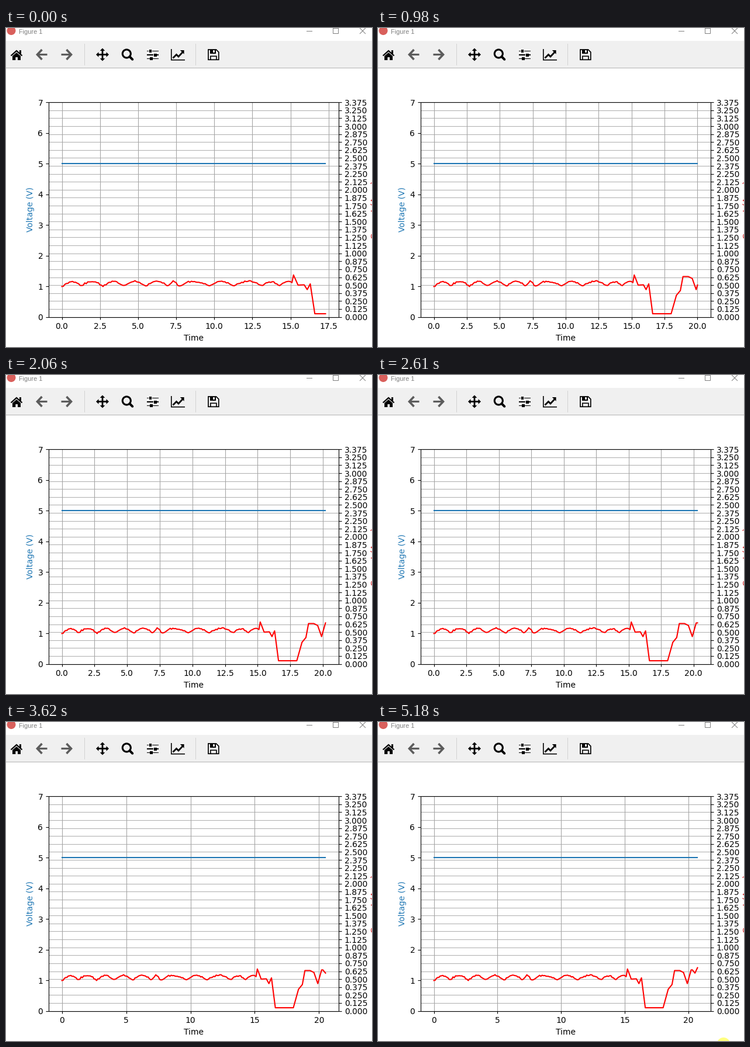
Animation of 626x546 px, one loop 5260 ms. Source, as a matplotlib script:

```python
import numpy as np
import matplotlib.pyplot as plt
from matplotlib.animation import FuncAnimation
from matplotlib.collections import LineCollection
from matplotlib.patches import Circle, Polygon, Rectangle

W, H, DPI = 626, 546, 100
LOOP, STEP = 5260, 20
PX = 72 / DPI  # points per pixel
LEFT, RIGHT, TOP, BOTTOM = 73, 569, 127.24, 494.53
MID_X, MID_Y = (LEFT + RIGHT) / 2, (TOP + BOTTOM) / 2
TICK, LABEL_GAP, LABEL_PAD = 3.5 / PX, 7 / PX, 4 / PX
VOLT_MAX, AMP_MAX, AMP_STEP = 7, 3.375, 0.125
BLUE, RED = "#1f77b4", "#ff0000"
ARROW_GREY, CONTROL_GREY, BAR_GREY = "#5c5c5c", "#808080", "#f0f0f0"

ARRIVALS = [120, 200, 430, 980, 1520, 2060, 2610, 3070, 3620, 4170, 4780]
FIRST_COUNT, SKIPPED, JUMP = 173, 23, 200
POINTER_TIME = 5180

# Moments (s) at which the steady ripple bottoms out.
DIPS = [0.1, 1.25, 2.7, 4.05, 5.5, 7.0, 7.65, 9.7, 11.25, 13.15, 14.25, 15.4]
# Switch-off and restart: (s, A).
EVENTS = [
    (15.1, 0.54), (15.2, 0.66), (15.5, 0.50), (15.9, 0.505), (16.1, 0.43),
    (16.3, 0.52), (16.6, 0.05), (18.0, 0.05), (18.4, 0.34), (18.7, 0.415),
    (18.9, 0.635), (19.3, 0.635), (19.6, 0.605), (19.9, 0.43), (20.2, 0.645),
    (20.3, 0.645), (20.5, 0.595), (20.7, 0.68),
]


def build_current(times):
    phase = np.interp(times, DIPS, range(len(DIPS)))
    noise = np.random.default_rng(4).normal(0, 0.006, len(times))
    ripple = 0.483 + 0.075 * np.abs(np.sin(np.pi * phase)) + noise
    event_times, event_amps = zip(*EVENTS)
    return np.where(times < event_times[0] - 0.01, ripple,
                    np.interp(times, event_times, event_amps))


TIMES = np.arange(208) / 10
CURRENT = build_current(TIMES)

plt.rcParams["font.family"] = "DejaVu Sans"
fig = plt.figure(figsize=(W / DPI, H / DPI), dpi=DPI, facecolor="white")
ax = fig.add_axes([0, 0, 1, 1])
ax.set(xlim=(0, W), ylim=(H, 0))
ax.autoscale(False)
ax.axis("off")


def stroke(points, width=1.0, color="black", **kw):
    x, y = zip(*points)
    style = dict(solid_capstyle="butt", solid_joinstyle="miter", zorder=4,
                 snap=False)
    return ax.plot(x, y, color=color, lw=width * PX, **{**style, **kw})[0]


def shape(points, color="black"):
    ax.add_patch(Polygon(points, color=color, lw=0, zorder=4))


def box(x0, y0, x1, y1, color="black", z=4):
    ax.add_patch(Rectangle((x0, y0), x1 - x0, y1 - y0, fc=color, lw=0, zorder=z))


def label(x, y, text, size=10, **kw):
    return ax.text(x, y, text, fontsize=size, **kw)


def segments(lines, color, z):
    group = LineCollection(lines, colors=color, linewidths=0.8, zorder=z)
    ax.add_collection(group, autolim=False)
    return group


def y_of(value, top_value):
    return BOTTOM - (BOTTOM - TOP) * np.asarray(value) / top_value


def draw_title_bar():
    ax.add_patch(Circle((9, 4.5), 7.5, color="#d9605c", lw=0))
    label(22, 10, "Figure 1", 7.9, color=CONTROL_GREY, family="Liberation Sans")
    stroke([(514, 5.5), (524, 5.5)], 1, CONTROL_GREY)
    ax.add_patch(Rectangle((559.5, 0.5), 9, 9, fill=False, ec=CONTROL_GREY,
                           lw=PX, snap=False))
    stroke([(605, 0), (615, 10)], 1, CONTROL_GREY)
    stroke([(605, 10), (615, 0)], 1, CONTROL_GREY)


def draw_arrow(tip, direction):
    bend, back, end = (tip + direction * d for d in (2, 10, 19))
    stroke([(bend, 45.5), (end, 45.5)], 3.2, ARROW_GREY)
    stroke([(back, 37), (bend, 45.5), (back, 54)], 3.6, ARROW_GREY)


def draw_home():
    stroke([(8.5, 47.5), (18, 39), (27.5, 47.5)], 2.2)
    box(23, 38, 25.6, 44)
    shape([(11, 48), (18, 42), (25, 48), (25, 55), (20, 55), (20, 50),
           (16.3, 50), (16.3, 55), (11, 55)])


def draw_move():
    cx, cy = 165, 45.5
    stroke([(cx - 8, cy), (cx + 8, cy)], 2.8)
    stroke([(cx, cy - 8), (cx, cy + 8)], 2.8)
    for s in (-1, 1):
        tip, base = 11 * s, 6.5 * s
        shape([(cx + tip, cy), (cx + base, cy - 4.3), (cx + base, cy + 4.3)])
        shape([(cx, cy + tip), (cx - 4.3, cy + base), (cx + 4.3, cy + base)])


def draw_search():
    ax.add_patch(Circle((206.3, 44), 7, fill=False, ec="black", lw=3.1 * PX,
                        zorder=4))
    stroke([(211.5, 49), (216.3, 53.8)], 4, solid_capstyle="round")


def draw_sliders():
    for y, knob in ((39.5, 247), (46, 255.2), (52.5, 248.5)):
        box(241, y - 0.9, 261, y + 0.9)
        box(knob - 2.9, y - 2.5, knob + 2.9, y + 2.5, BAR_GREY)
        box(knob - 2.3, y - 2.5, knob + 2.3, y + 2.5)


def draw_chart():
    stroke([(282.8, 36), (282.8, 54.7), (306, 54.7)], 1.6)
    stroke([(285.5, 51.5), (291.5, 45.5), (295, 49), (302.5, 41)], 2.8)
    shape([(304.6, 38), (304.6, 44.8), (297.8, 38)])


def draw_floppy():
    stroke([(346, 37), (359.5, 37), (363.8, 41.3), (363.8, 54.3), (346, 54.3),
            (346, 36.2)], 1.7)
    stroke([(349.8, 54), (349.8, 48.3), (360, 48.3), (360, 54)], 1.6)
    box(349, 37, 358.6, 43.5)
    box(354.3, 38, 357, 42, BAR_GREY)


def draw_toolbar():
    box(0, 22, W, 68, BAR_GREY, 1)
    stroke([(0, 68.5), (W, 68.5)], 1, "#b4b4b4")
    for x in (134.5, 324.5):
        stroke([(x, 27), (x, 64)], 1, "#d2d2d2")
    draw_home()
    draw_arrow(51.5, 1)
    draw_arrow(113.5, -1)
    draw_move()
    draw_search()
    draw_sliders()
    draw_chart()
    draw_floppy()


def draw_fixed_axes():
    amps = np.arange(0, AMP_MAX + 0.01, AMP_STEP)
    volts = np.arange(VOLT_MAX + 1)
    rows, volt_rows = y_of(amps, AMP_MAX), y_of(volts, VOLT_MAX)
    segments([[(LEFT, y), (RIGHT, y)] for y in rows], "#b4b4b4", 2)
    segments([[(RIGHT, y), (RIGHT + TICK, y)] for y in rows]
             + [[(LEFT - TICK, y), (LEFT, y)] for y in volt_rows], "black", 6)
    for a, y in zip(amps, rows):
        label(RIGHT + LABEL_GAP, y, f"{a:.3f}", va="center_baseline")
    for v, y in zip(volts, volt_rows):
        label(LEFT - LABEL_GAP, y, str(v), ha="right", va="center_baseline")
    segments([[(x, TOP), (x, BOTTOM)] for x in (LEFT, RIGHT)]
             + [[(LEFT, y), (RIGHT, y)] for y in (TOP, BOTTOM)], "black", 6)

    label(MID_X, 535, "Time", ha="center")
    side = dict(rotation=90, rotation_mode="anchor", ha="center")
    label(LEFT - LABEL_GAP - 8.8 - LABEL_PAD, MID_Y, "Voltage (V)", color=BLUE,
          va="bottom", **side)
    label(RIGHT + LABEL_GAP + 39.8 + LABEL_PAD, MID_Y, "Current (Amp)",
          color="#d62728", va="top", **side)


draw_title_bar()
draw_toolbar()
draw_fixed_axes()

columns = segments([], "#a6a6a6", 2)
x_ticks = segments([], "black", 6)
x_labels = [label(0, BOTTOM + LABEL_GAP, "", ha="center", va="top")
            for _ in range(9)]
volt_y = float(y_of(5, VOLT_MAX))
volt_line = stroke([(0, volt_y)] * 2, 2.08, BLUE, solid_capstyle="projecting",
                   snap=None)
amp_line = stroke([(0, 0)], 2.08, RED, solid_capstyle="projecting",
                  solid_joinstyle="round", zorder=5)
pointer = ax.add_patch(Circle((591, 551.3), 11.3, color="#ffff80", lw=0, zorder=8))


def update(i):
    t = i * STEP + STEP / 2
    last = FIRST_COUNT + sum(t >= a for a in ARRIVALS) + SKIPPED * (t >= JUMP)
    span = TIMES[last]
    scale = (RIGHT - LEFT) / (1.1 * span)  # 5 % margin on each side
    origin = LEFT + 0.05 * span * scale

    step, digits = (2.5, 1) if 1.1 * span / 9 <= 2.5 else (5, 0)
    marks = np.arange(0, 1.05 * span, step)
    xs = origin + marks * scale
    columns.set_segments([[(x, TOP), (x, BOTTOM)] for x in xs])
    x_ticks.set_segments([[(x, BOTTOM), (x, BOTTOM + TICK)] for x in xs])
    for k, text in enumerate(x_labels):
        shown = k < len(marks)
        text.set_visible(shown)
        if shown:
            text.set_x(xs[k])
            text.set_text(f"{marks[k]:.{digits}f}")

    volt_line.set_xdata([origin, origin + span * scale])
    amp_line.set_data(origin + TIMES[:last + 1] * scale,
                      y_of(CURRENT[:last + 1], AMP_MAX))
    pointer.set_visible(t >= POINTER_TIME)
    return columns, x_ticks, *x_labels, volt_line, amp_line, pointer


anim = FuncAnimation(fig, update, frames=LOOP // STEP, interval=STEP,
                     repeat=True, repeat_delay=0)
plt.show()
```
